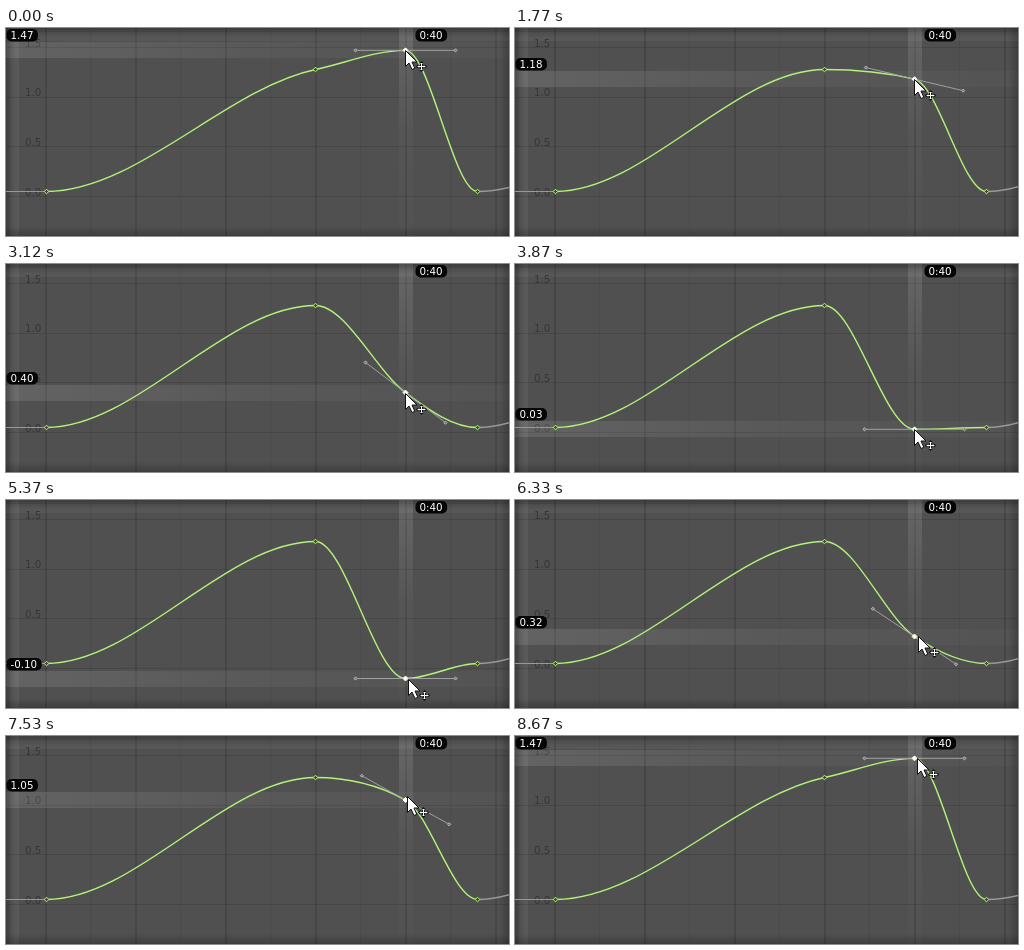
Write an HTML page with a canvas that moves like this. It is 503 px wide and 208 px high and loops after 8700 ms.

```html
<!DOCTYPE html>
<html>
<head>
<meta charset="utf-8">
<style>
html, body { margin: 0; width: 100%; height: 100%; overflow: hidden; background: #505050; }
canvas { display: block; }
</style>
</head>
<body>
<canvas id="stage" width="503" height="208"></canvas>
<script>
const W = 503, H = 208, LOOP = 8700, STEP = 30;
const ctx = document.getElementById('stage').getContext('2d');
const FONT = '10.3px "DejaVu Sans", sans-serif';

// [time, value of the dragged key]
const drag = [[0, 1.47], [1230, 1.47], [1770, 1.18], [3120, .4], [3870, .03], [4380, -.11], [4590, -.12],
  [5220, -.12], [6090, .21], [6330, .32], [7530, 1.05], [7920, 1.32], [8460, 1.46], [8700, 1.47]];
// [time, pointer offset from the key]
const offsetX = [[0, 0], [3870, 0], [4590, 2], [6330, 4], [7530, 2], [8700, 3]];
const offsetY = [[0, 0], [4590, 0], [6330, -1], [7530, -4], [8700, 0]];

const toY = value => 168 - 99.3 * value;
const clamp01 = v => Math.max(0, Math.min(1, v));

// Monotone cubic interpolation through the knots.
function sample(knots, t) {
  const secant = i => knots[i + 1] ? (knots[i + 1][1] - knots[i][1]) / (knots[i + 1][0] - knots[i][0]) : 0;
  const slope = i => {
    const a = i ? secant(i - 1) : 0, b = secant(i);
    return a * b > 0 ? 2 * a * b / (a + b) : 0;
  };
  let i = 0;
  while (i < knots.length - 2 && t >= knots[i + 1][0]) i++;
  const [t0, v0] = knots[i], [t1, v1] = knots[i + 1];
  const d = t1 - t0, u = (t - t0) / d, w = 1 - u;
  return v0 * w * w * (1 + 2 * u) + v1 * u * u * (3 - 2 * u)
    + d * u * w * (w * slope(i) - u * slope(i + 1));
}

// Clamped automatic tangent: flattens near the neighbours' values.
function tangent(prev, key, next) {
  const r = (key.y - prev.y) / (next.y - prev.y);
  return (next.y - prev.y) / (next.x - prev.x) * clamp01(4 * Math.min(r, 1 - r));
}

function rect(x, y, w, h, fill) {
  ctx.fillStyle = fill;
  ctx.fillRect(x, y, w, h);
}

function gradient(x, y, ...stops) {
  const g = ctx.createLinearGradient(0, 0, x, y);
  stops.forEach((c, i) => g.addColorStop(i / (stops.length - 1), c));
  return g;
}

function line(x0, y0, x1, y1, color, width = 1) {
  ctx.beginPath();
  ctx.moveTo(x0, y0);
  ctx.lineTo(x1, y1);
  ctx.strokeStyle = color;
  ctx.lineWidth = width;
  ctx.stroke();
}

function segment(a, b, color, shift = 0) {
  const d = (b.x - a.x) / 3;
  ctx.beginPath();
  ctx.moveTo(a.x + shift, a.y);
  ctx.bezierCurveTo(a.x + d + shift, a.y + a.m * d, b.x - d + shift, b.y - b.m * d, b.x + shift, b.y);
  ctx.strokeStyle = color;
  ctx.lineWidth = 1.4;
  ctx.stroke();
}

function diamond(x, y, r, fill, stroke) {
  ctx.beginPath();
  ctx.moveTo(x, y - r);
  ctx.lineTo(x + r, y);
  ctx.lineTo(x, y + r);
  ctx.lineTo(x - r, y);
  ctx.closePath();
  ctx.fillStyle = fill;
  ctx.fill();
  ctx.strokeStyle = stroke;
  ctx.lineWidth = 1;
  ctx.stroke();
}

function label(text, x, cy) {
  ctx.font = FONT;
  ctx.fillStyle = '#050505';
  ctx.beginPath();
  ctx.roundRect(x, cy - 6, ctx.measureText(text).width + 8.5, 12.5, 5);
  ctx.fill();
  ctx.fillStyle = '#fff';
  ctx.fillText(text, x + 4, cy + 3.8);
}

function drawGrid() {
  rect(0, 0, W, H, '#505050');
  for (let x = 40; x < W; x += 45) {
    const major = (x - 40) % 90 === 0;
    rect(x - 1, 0, major ? 2 : 1, H, major ? 'rgba(0,0,0,.12)' : 'rgba(0,0,0,.05)');
  }
  for (let v = 0; v <= 1.5; v += .5) rect(0, Math.round(toY(v)), W, 1, 'rgba(0,0,0,.12)');
  rect(4, 0, 9, H, 'rgba(255,255,255,.05)');
  rect(0, 4, W, 9, 'rgba(255,255,255,.04)');
  ctx.font = FONT;
  ctx.fillStyle = '#363636';
  for (let v = 0; v <= 1.5; v += .5) ctx.fillText(v.toFixed(1), 19, toY(v) - .5);
}

function drawShade() {
  const dark = 'rgba(0,0,0,.22)', clear = 'rgba(0,0,0,0)';
  for (const [x, y, sx, sy] of [[0, 0, 0, 1], [0, H, 0, -1], [0, 0, 1, 0], [W, 0, -1, 0]]) {
    ctx.save();
    ctx.translate(x, y);
    const g = gradient(sx * 10, sy * 10, dark, clear);
    rect(0, 0, sx ? sx * 10 : W, sy ? sy * 10 : H, g);
    ctx.restore();
  }
}

function drawPointer(x, y) {
  ctx.save();
  ctx.translate(x, y);
  ctx.beginPath();
  for (const [px, py] of [[.5, .5], [.5, 16.5], [4, 13], [7, 19.5], [9.8, 18.3], [7, 12], [12, 12]]) ctx.lineTo(px, py);
  ctx.closePath();
  ctx.fillStyle = '#fff';
  ctx.fill();
  ctx.strokeStyle = '#111';
  ctx.lineWidth = 1;
  ctx.stroke();

  ctx.translate(16.5, 16.5);
  const arrows = new Path2D('M-3.5 0H3.5M0-3.5V3.5M-2.5-1L-3.5 0L-2.5 1M2.5-1L3.5 0L2.5 1M-1-2.5L0-3.5L1-2.5M-1 2.5L0 3.5L1 2.5');
  for (const [color, width] of [['#111', 3], ['#fff', 1]]) {
    ctx.strokeStyle = color;
    ctx.lineWidth = width;
    ctx.stroke(arrows);
  }
  ctx.restore();
}

function draw(t) {
  const value = sample(drag, t);
  const a = { x: 40.5, y: 163.5, m: 0 }, b = { x: 309.5, y: 41.5 };
  const p = { x: 399.5, y: toY(value) + .3 }, c = { x: 471.5, y: 163.5, m: 0 };
  b.m = tangent(a, b, p);
  p.m = tangent(b, p, c);

  drawGrid();
  const y = Math.round(p.y);
  rect(0, y - 8, W, 16, gradient(W, 0, 'rgba(255,255,255,.11)', 'rgba(255,255,255,.05)', 'rgba(255,255,255,.02)'));
  rect(393, 0, 14, H, gradient(0, H, 'rgba(255,255,255,.13)', 'rgba(255,255,255,.03)', 'rgba(255,255,255,.01)'));
  drawShade();

  const gray = '#989898', green = '#b4f27a';
  line(0, 163.5, a.x, 163.5, gray);
  segment(a, b, gray, c.x - a.x);
  segment(a, b, green);
  segment(b, p, green);
  segment(p, c, green);

  const n = 50 / Math.hypot(1, p.m), hx = n, hy = n * p.m;
  line(p.x - hx, p.y - hy, p.x + hx, p.y + hy, '#a0a0a0');
  for (const s of [-1, 1]) diamond(p.x + s * hx, p.y + s * hy, 1.6, '#777', '#b8b8b8');
  for (const k of [a, b, c]) diamond(k.x, k.y, 2.3, '#3c4a2c', '#b8fa74');
  diamond(p.x, p.y, 2.5, '#fff', '#f4fbe8');

  label(value.toFixed(2), .5, y - 15);
  label('0:40', 409.5, 7);
  drawPointer(399 + Math.round(sample(offsetX, t)), y + Math.round(sample(offsetY, t)));
}

function frame() {
  const t = performance.now() % LOOP;
  draw(Math.floor(t / STEP) * STEP);
  requestAnimationFrame(frame);
}
frame();
</script>
</body>
</html>
```
